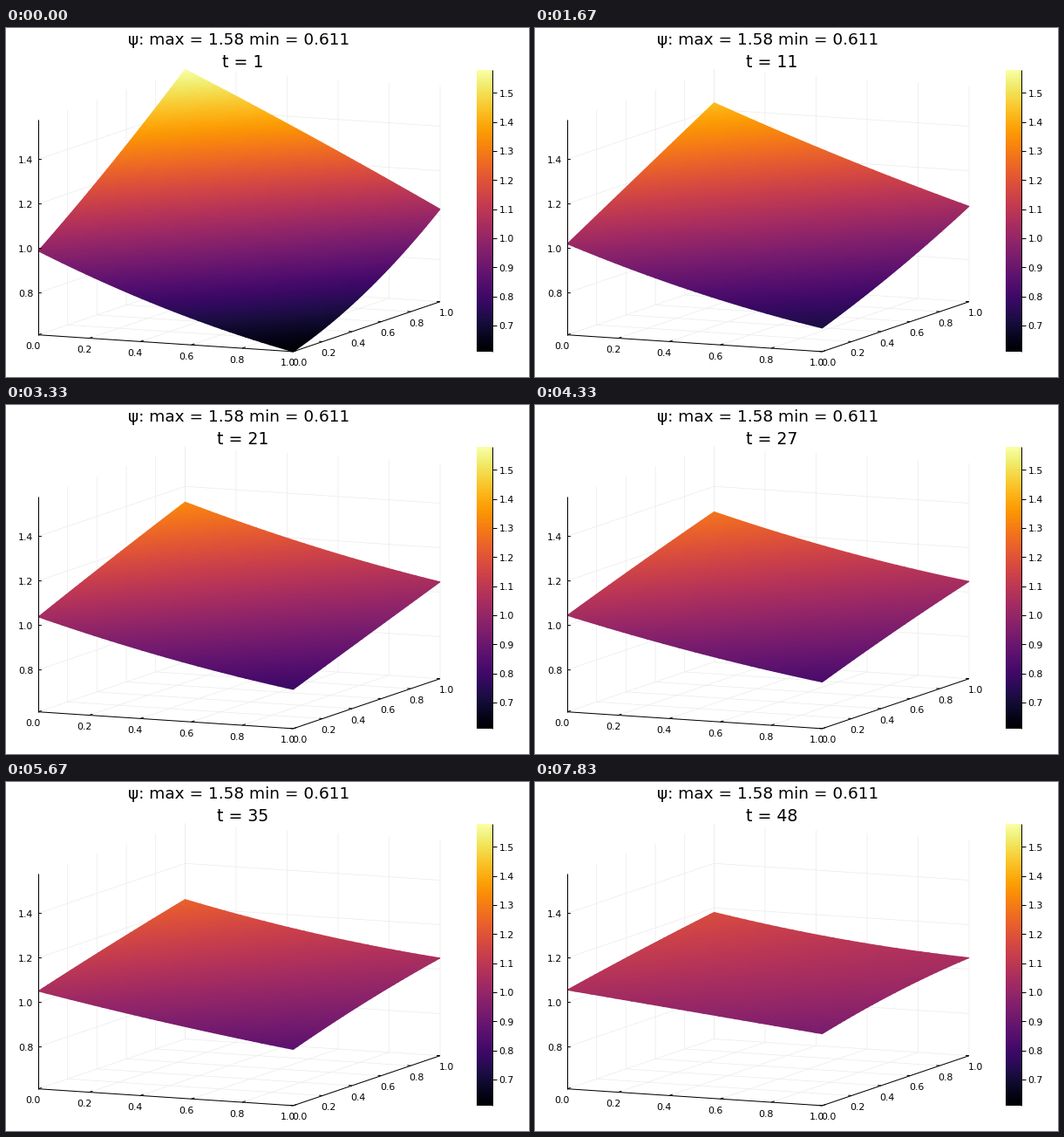
A matplotlib script for the animation above (8000 ms loop, 600 by 400 pixels).

```python
import numpy as np
import matplotlib.pyplot as plt
from matplotlib.animation import FuncAnimation

W, H, DPI = 600, 400, 100
FRAMES = 48
INTERVAL = 166.4
ZMIN, ZMAX = 0.611, 1.58
SCALE = 255.0                       # pixels per unit of z
ORIGIN = np.array([37.0, 351.7])
EX = np.array([292.5, 19.2])        # screen vectors of the x and y axes
EY = np.array([168.5, -57.2])
TICKS = np.linspace(0, 1, 6)
ZTICKS = np.arange(0.8, 1.5, 0.2)

plt.rcParams["font.family"] = "DejaVu Sans"
fig = plt.figure(figsize=(W / DPI, H / DPI), dpi=DPI, facecolor="white")
ax = fig.add_axes([0, 0, 1, 1])
ax.axis("off")


def project(x, y, z=ZMIN):
    px = ORIGIN[0] + EX[0] * x + EY[0] * y
    py = ORIGIN[1] + EX[1] * x + EY[1] * y - SCALE * (z - ZMIN)
    return px, py


def line(points, color="black", lw=1.0, zorder=6):
    px, py = zip(*points)
    ax.plot(px, py, color=color, lw=lw * 72 / DPI, zorder=zorder,
            solid_capstyle="butt")


def label(x, y, text, px=11, ha="center", va="center_baseline"):
    return ax.text(x, y, text, fontsize=px * 72 / DPI, ha=ha, va=va)


def tick(p, d):
    line([p, (p[0] + d[0], p[1] + d[1])])


def draw_grid():
    grid = dict(color="#ebebeb", lw=0.7, zorder=1)
    for v in TICKS:
        line([project(v, 0), project(v, 1), project(v, 1, ZMAX)], **grid)
        line([project(1, v), project(0, v), project(0, v, ZMAX)], **grid)
    for z in ZTICKS:
        line([project(0, 0, z), project(0, 1, z), project(1, 1, z)], **grid)


def draw_axes():
    line([project(0, 0, ZMAX), project(0, 0)])
    line([project(0, 0), project(1, 0), project(1, 1)])
    for v in TICKS:
        p = project(v, 0)
        tick(p, (3.8, -1.3))
        label(p[0] - 6, p[1] + 12.5, f"{v:.1f}")
        p = project(1, v)
        tick(p, (-3.9, -0.3))
        label(p[0] + 7, p[1] + 12.5, f"{v:.1f}")
    for z in ZTICKS:
        p = project(0, 0, z)
        tick(p, (3.9, 0.2))
        label(31.5, p[1], f"{z:.1f}", ha="right")


def draw_colorbar():
    left, right, top, bottom = 540, 558, 48, 371
    ramp = np.linspace(1, 0, 256)[:, None]
    ax.imshow(ramp, cmap="inferno", extent=(left, right, bottom, top),
              aspect="auto", interpolation="nearest", zorder=2)
    line([(right, top), (right, bottom)])
    for v in np.arange(0.7, 1.55, 0.1):
        y = bottom - (v - ZMIN) / (ZMAX - ZMIN) * (bottom - top)
        tick((right, y - 0.5), (5, 0))
        label(565.5, y, f"{v:.1f}", ha="left")


N = 33
X, Y = np.meshgrid(np.linspace(0, 1, N), np.linspace(0, 1, N))


def height(s):
    """Surface height s steps after the start: a field that levels out."""
    def decay(tau):
        return np.exp(-s / tau)

    early = 1 / (1 + (s / 8) ** 5)   # holds at first, then drops quickly

    # corner heights, named by (x, y)
    z00 = 1.06 - 0.072 * decay(17)
    z11 = 1.052 - 0.025 * decay(14)
    z01 = 1.05 + 0.492 * decay(35.3) + 0.038 * early
    z10 = 0.68 + 0.0054 * s - 0.069 * early
    z = ((1 - Y) * (z00 * (1 - X) + z10 * X)
         + Y * (z01 * (1 - X) + z11 * X))

    # sag of each edge at its middle, in pixels
    front = 8 * (1 - s / (FRAMES - 1))
    back = 5 - 7 * early
    left = -1 + 5 * decay(6)
    right = -5 + 17 * decay(16)
    sag = (X * (1 - X) * (front * (1 - Y) + back * Y)
           + Y * (1 - Y) * (left * (1 - X) + right * X))
    return z - 4 * sag / SCALE


draw_grid()
draw_axes()
draw_colorbar()
label(267, 19, "ψ: max = 1.58 min = 0.611", 18.5, va="baseline")
step_text = label(271.5, 45, "", 18.9, va="baseline")
surface = []


def update(frame):
    while surface:
        surface.pop().remove()
    z = height(frame)
    surface.append(ax.pcolormesh(*project(X, Y, z), z, cmap="inferno",
                                 vmin=ZMIN, vmax=ZMAX, shading="gouraud",
                                 zorder=3))
    ax.set_xlim(0, W)
    ax.set_ylim(H, 0)
    step_text.set_text(f"t = {frame + 1}")
    return surface + [step_text]


anim = FuncAnimation(fig, update, frames=FRAMES, interval=INTERVAL,
                     repeat=True, repeat_delay=0, blit=False)
plt.show()
```
